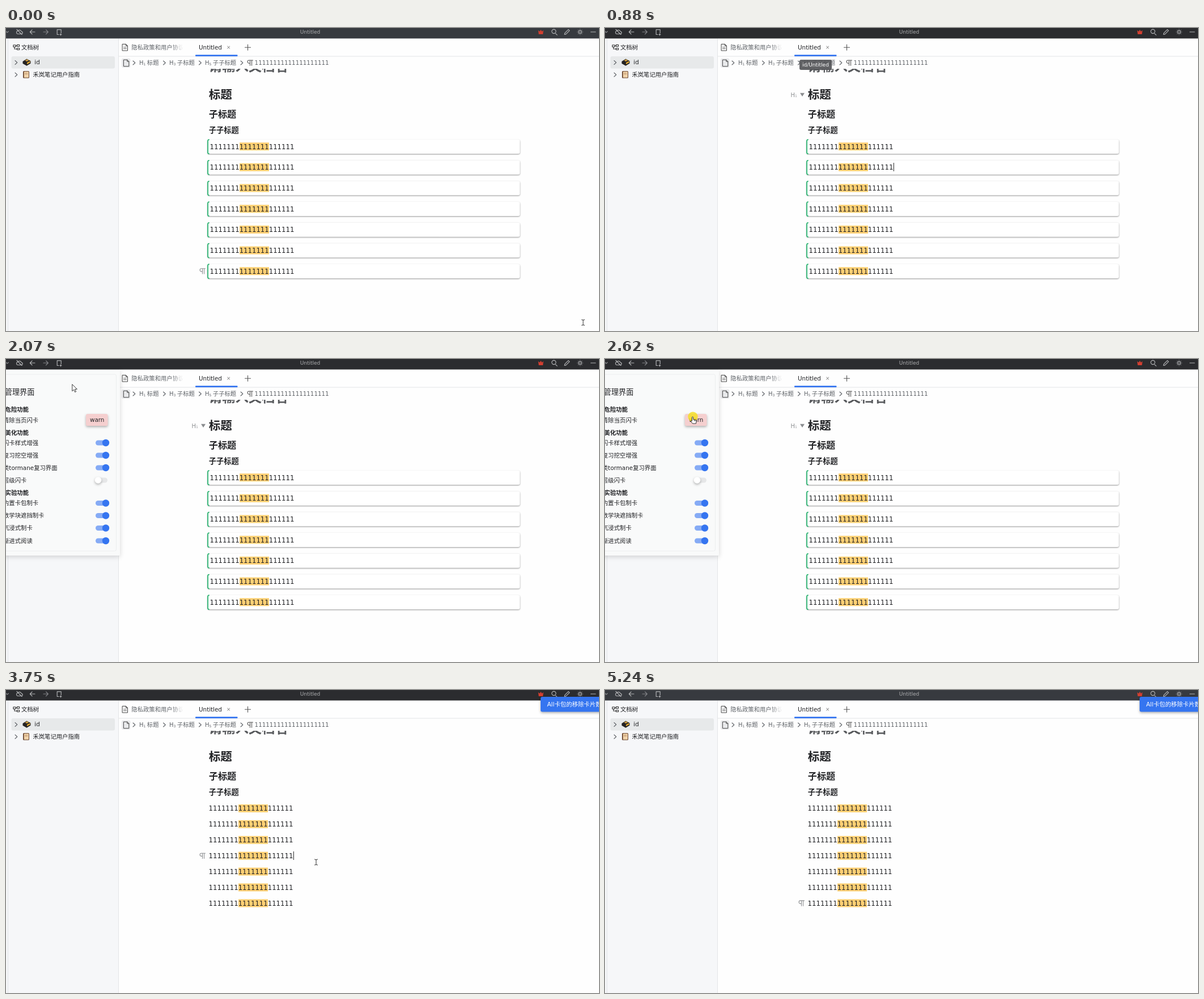
Animation of 1046x535 px, one loop 5.3 s. Source, as an HTML page:

```html
<!DOCTYPE html>
<html lang="zh-CN">
<head>
<meta charset="utf-8">
<title>Untitled</title>
<style>
  html, body { margin: 0; width: 100%; height: 100%; overflow: hidden; background: #fff; }
  svg { display: block; width: 1046px; height: 535px; }
  text { font-family: 'DejaVu Sans', 'Noto Sans CJK SC', 'Noto Sans CJK', sans-serif; white-space: pre; }
  .card { fill: #fff; filter: drop-shadow(.7px 1px 1px rgba(0,0,0,.42)); }
  .panel { filter: drop-shadow(0 2px 4px rgba(0,0,0,.16)); }
  .lift { filter: drop-shadow(0 2px 2px rgba(0,0,0,.3)); }
  .line { fill: none; stroke-linecap: round; stroke-linejoin: round; }
</style>
</head>
<body>
<svg id="stage" viewBox="0 0 1046 535" xmlns="http://www.w3.org/2000/svg"></svg>
<script>
const LOOP = 5300;
const BLUE = '#3575f0', INK = '#202124', GREY = '#5f6368', BAR_ICON = '#b4b5b7';

// Text is placed by its left edge and vertical centre.
const text = (x, cy, s, size = 10.35, fill = INK, extra = '') =>
  `<text x="${x}" y="${cy + size * .37}" font-size="${size}" fill="${fill}" ${extra}>${s}</text>`;
const rect = (x, y, w, h, fill, r = 0, extra = '') =>
  `<rect x="${x}" y="${y}" width="${w}" height="${h}" rx="${r}" fill="${fill}" ${extra}/>`;
const line = (d, color, width = 1, extra = '') =>
  `<path class="line" d="${d}" stroke="${color}" stroke-width="${width}" ${extra}/>`;
const group = (id, body, extra = '') => `<g id="${id}" ${extra}>${body}</g>`;

const chevron = (x, y, color = GREY) => line(`M${x - 2} ${y - 3.5}l3.8 3.5l-3.8 3.5`, color, 1.1);
const pilcrow = (x, y, color) =>
  line(`M${x + 10} ${y - 4.5}H${x + 3.2}a2.6 2.6 0 0 0 0 5.2H${x + 5}M${x + 5} ${y - 4.5}v9.3M${x + 8} ${y - 4.5}v9.3`, color, 1.1);
const headingMark = (x, y, n, color) =>
  text(x, y, 'H', 10, color) + text(x + 7.6, y + 2, n, 6, color);
const page = (x, y, lines) =>
  line(`M${x} ${y}h6l3 3v8.5h-9zM${x + 6} ${y}v3h3`, '#444', 1) +
  (lines ? line(`M${x + 2} ${y + 5.5}h5M${x + 2} ${y + 8}h5`, '#444', .8) : '');

const rowY = (i, carded) => carded ? 209.2 + i * 36.67 : 209 + i * 27.9;
const noteRow = (i, carded) => {
  const y = rowY(i, carded), x = carded ? 360 : 358;
  const frame = carded
    ? `<rect class="card" x="355.5" y="${y - 12.2}" width="551" height="25" rx="3"/>` +
      line(`M358 ${y - 12}q-2 .3 -2 2.5v20q0 2.2 2 2.5`, '#2fb574', 1.8)
    : '';
  return frame + rect(x + 52, y - 7, 52, 14, '#fdd074') + text(x - .4, y, '1'.repeat(20), 11.7);
};
const noteRows = carded => Array.from({ length: 7 }, (_, i) => noteRow(i, carded)).join('');

function topBar() {
  const icon = (d, color = BAR_ICON) => line(d, color, 1.15);
  return rect(0, 0, 1046, 18.5, '#2b2c2f', 0, 'id="bar"') +
    rect(81, 0, 24, 18.5, '#46474b', 0, 'id="hover"') +
    icon('M0 6l2.2 2l2.2 -2', '#8c8d90') +
    icon('M20.5 10.5h6.5a2.1 2.1 0 0 0 .3 -4.2a3.8 3.8 0 0 0 -6.8 -1a2.7 2.7 0 0 0 0 5.2M19 2.5l9 9') +
    icon('M51 7h-8.5m3.6 -3.8l-3.8 3.8l3.8 3.8') +
    icon('M66 7h8m-3.5 -3.8l3.8 3.8l-3.8 3.8', '#85868a') +
    icon('M93 11.5h-2.8v-8.7h7v6M95 11.5h3M96.5 10v3') +
    `<text x="536.5" y="10.3" font-size="9" fill="#aeafb1" text-anchor="middle">Untitled</text>` +
    `<path d="M938.8 4l2.6 2.3l2 -3.3l2 3.3l2.6 -2.3l-.9 7h-7.4z" fill="#d23f31"/>` +
    icon('M969.5 9.8l2.7 2.5M970 6a3.6 3.6 0 1 1 -7.2 0a3.6 3.6 0 1 1 7.2 0') +
    icon('M985.2 11.5l.6 -2.6l6.2 -6.2l2 2l-6.2 6.2z') +
    icon('M1015 7a2.4 2.4 0 1 1 -4.8 0a2.4 2.4 0 1 1 4.8 0') +
    icon('M1012.6 2.4v.4M1012.6 11.2v.4M1008 7h.4M1016.8 7h.4M1009.4 3.8l.2 .2M1015.6 10l.2 .2M1009.4 10.2l.2 -.2M1015.6 4l.2 -.2') +
    icon('M1031.5 7h8.5');
}

function sidebar() {
  return rect(0, 18.5, 198, 517, '#f6f7f9') + rect(3, 18.5, 1, 517, '#e2e4e7') +
    rect(198, 18.5, 1, 517, '#e4e5e7') +
    line('M13 30h4v3.5h-4zM19.5 29.5h4v3h-4zM19.5 35.5h4v3h-4zM17 31.5h2.5M15 33.5v3.5h4.5', '#333', 1.2) +
    text(27, 34, '文档树') +
    rect(9.5, 50, 182.5, 21.5, '#e7e9ea', 3) +
    chevron(18, 61) + chevron(18, 82.5) +
    '<path d="M29.5 59l7 -4.5l7 3.7v4.3l-7 4.3l-7 -4z" fill="#252323"/>' +
    '<path d="M33.5 57.3l3.5 -2.1l3.5 1.8l-3.7 2.2z" fill="#c99a43"/>' +
    '<path d="M37 61.3l5.5 -3v2.6l-5.5 3.2z" fill="#e7ae36"/>' +
    text(50.3, 60.3, 'id') +
    rect(30, 76, 11, 12.5, '#6b4730', 1.5) + rect(31.8, 77, 8.2, 10.5, '#f0d3aa', .8) +
    line('M33.5 79.5h4.5M33.5 81.5h4.5', '#b88b62', .8) +
    text(47.4, 82, '禾岚笔记用户指南');
}

function editor() {
  const crumb = (x, n, s) => headingMark(x, 61.5, n, GREY) + text(x + 13.8, 61.5, s, 10.35, GREY);
  return rect(199, 18.5, 847, 517, '#fefefe') + rect(199, 49.5, 847, 1, '#e4e5e7') +
    page(205.5, 28.5, true) + text(221.3, 34, '隐私政策和用户协议', 10.35, GREY) +
    rect(292, 25, 24, 18, 'url(#fade)') +
    text(340, 33.8, 'Untitled') + rect(334, 47.3, 74.5, 2.7, BLUE, 1) +
    line('M390.6 32.2l4 4m0 -4l-4 4', '#666', .9) + line('M421.5 34.3h10M426.5 29.3v10', '#555', 1.1) +
    rect(204, 53.5, 15.5, 16.5, '#e9eaec', 3) + page(207.8, 56.2) +
    [226, 279.5, 342.5, 416].map(x => chevron(x, 61.5)).join('') +
    crumb(235, 1, '标题') + crumb(288, 3, '子标题') + crumb(351, 5, '子子标题') +
    pilcrow(425.5, 61.5, '#555') + text(438.6, 61.5, '1'.repeat(20), 10.3, GREY) +
    `<g clip-path="url(#scroll)">${text(357.8, 67.2, '请输入文档名', 23.3, '#57595c', 'font-weight="700"')}</g>` +
    text(357.8, 117.6, '标题', 20.5, INK, 'font-weight="700"') +
    text(357.8, 152.5, '子标题', 16.15, INK, 'font-weight="700"') +
    text(357.8, 180, '子子标题', 13.25, INK, 'font-weight="700"');
}

function settingsPanel() {
  const section = (y, s) => text(-1.5, y, s, 10.4, INK, 'font-weight="700"');
  const toggle = (y, s, on = true) => text(-5, y, s) + (on
    ? rect(158, y - 4.5, 24, 9, '#86abf5', 4.5) + `<circle cx="176" cy="${y}" r="6.2" fill="${BLUE}"/>`
    : rect(157, y - 4.5, 22, 9, '#e6e7e8', 4.5) + `<circle class="lift" cx="162.5" cy="${y}" r="5.8" fill="#fff"/>`);
  return rect(-10, 19, 211, 328, '#f9fafa', 2, 'class="panel"') +
    rect(-10, 27, 204.5, 312, 'none', 3, 'stroke="#eceeef"') +
    text(-2.3, 58.5, '管理界面', 13.2) +
    section(89.5, '危险功能') + text(-5, 108, '清除当页闪卡') +
    rect(141, 97, 38.5, 21, '#f5cfcf', 3, 'class="lift"') + text(148, 107.3, 'warn') +
    section(130, '美化功能') + toggle(148, '闪卡样式增强') + toggle(170, '复习挖空增强') +
    toggle(192, '类tormane复习界面') + toggle(214, '层级闪卡', false) +
    section(236.5, '实验功能') + toggle(254.5, '内置卡包制卡') + toggle(276.5, '数学块遮挡制卡') +
    toggle(298.5, '沉浸式制卡') + toggle(321, '渐进式阅读');
}

const tooltip = (id, x, y, w, h, s, pad) =>
  group(id, rect(x, y, w, h, '#55575a', 3, 'fill-opacity=".93"') + text(x + pad, y + h / 2 - .3, s, 9, '#fff'));

const cursors =
  group('ibeam', line('M-2.5 -5q2 0 2.5 1q.5 -1 2.5 -1M0 -4v8M-2.5 5q2 0 2.5 -1q.5 1 2.5 1', '#333', 1)) +
  group('arrow', '<path d="M0 0v12l2.8 -2.6l2 4.4l2 -.9l-2 -4.3h3.8z" fill="#fff" stroke="#222" stroke-width=".9"/>') +
  group('hand', '<path d="M-1.5 .5q1.3 -1.2 2.2 .3v4l4.3 .9q1.3 .4 1.2 2l-.7 4.3h-6l-3.4 -4.2q.6 -1.6 2.4 -.1z" fill="#fff" stroke="#222" stroke-width=".9" stroke-linejoin="round"/>' +
    line('M2.3 5v2.5M4 5.4v2.3', '#222', .6));

document.getElementById('stage').innerHTML =
  `<defs>
    <linearGradient id="fade"><stop stop-color="#fefefe" stop-opacity="0"/><stop offset=".85" stop-color="#fefefe"/></linearGradient>
    <clipPath id="scroll"><rect x="199" y="72" width="847" height="463"/></clipPath>
  </defs>` +
  editor() + sidebar() + topBar() +
  group('cards', noteRows(true)) + group('plain', noteRows(false)) +
  group('paraMark', pilcrow(341.5, 0, '#8e9093')) +
  group('headMark', headingMark(327.5, 118, 1, '#8e9093') + '<path d="M344 114.8h8l-4 6.2z" fill="#8b8d90"/>') +
  rect(0, 0, 1, 15, '#222', 0, 'id="caret"') +
  group('panel', settingsPanel()) +
  tooltip('tabTip', 343, 56, 57, 18, 'id/Untitled', 5) +
  tooltip('menuTip', 39.5, 21.5, 64.5, 19.5, '打开闪卡菜单', 5.3) +
  group('toast', rect(943, 12, 190, 26.5, BLUE, 3, 'class="lift"') +
    text(954.5, 24.7, 'All卡包的移除卡片数量为7', 10.4, '#fff', 'font-weight="500"')) +
  group('mouse', '<circle id="click" r="8.7" fill-opacity=".8"/>' + cursors);

const el = {};
document.querySelectorAll('#stage [id]').forEach(node => el[node.id] = node);

// Pointer path: time, x, y
const path = [
  [60, 1018, 520], [280, 600, 247], [520, 600, 247], [640, 470, 130], [780, 365, 36], [870, 400, -20],
  [1270, 330, -20], [1350, 300, 6], [1600, 93, 9], [1860, 93, 9], [2410, 155, 102], [2920, 155, 102],
  [3110, 444, 213], [3420, 547, 304], [3880, 547, 304], [4100, 801, 494], [4170, 830, 560]
];

function pointerAt(t) {
  const next = path.findIndex(key => key[0] > t);
  if (next === 0) return path[0].slice(1);
  if (next < 0) return path[path.length - 1].slice(1);
  const [t0, x0, y0] = path[next - 1], [t1, x1, y1] = path[next];
  const k = (t - t0) / (t1 - t0);
  return [x0 + (x1 - x0) * k, y0 + (y1 - y0) * k];
}

const show = (node, on) => node.setAttribute('display', on ? 'inline' : 'none');
const move = (node, x, y) => node.setAttribute('transform', `translate(${x} ${y})`);

function render(t) {
  const during = (a, b) => t >= a && t < b;
  const carded = t < 2740;

  el.bar.setAttribute('fill', during(470, 5170) ? '#2b2c2f' : '#373a3f');
  show(el.hover, during(1540, 1950));
  show(el.cards, carded);
  show(el.plain, !carded);
  show(el.panel, during(1810, 3690));
  show(el.tabTip, during(770, 950));
  show(el.menuTip, during(1600, 1880));

  const onHeading = during(620, 3200);
  const row = t < 250 || t >= 4030 ? 6 : t < 620 ? 1 : 3;
  show(el.headMark, onHeading);
  show(el.paraMark, !onHeading);
  move(el.paraMark, 0, rowY(row, carded));

  show(el.caret, during(540, 1070) || during(1600, 1680) || during(3640, 4170) || during(4700, 5230));
  move(el.caret, carded ? 508.8 : 506.8, carded ? 238 : 285);

  const slide = Math.min(1, Math.max(0, (t - 2950) / 140));
  show(el.toast, t >= 2950);
  move(el.toast, 103 * (1 - slide) ** 2, 0);

  const [x, y] = pointerAt(t);
  const overText = x > 201 && y > 75;
  const overButton = during(1560, 1880) || during(2330, 2960);
  move(el.mouse, x, y);
  show(el.ibeam, overText);
  show(el.hand, !overText && overButton);
  show(el.arrow, !overText && !overButton);
  const rightClick = during(1670, 1810);
  show(el.click, rightClick || during(470, 540) || during(2550, 2740) || during(3630, 3700));
  el.click.setAttribute('fill', rightClick ? '#e0161c' : '#f5df1c');
}

const start = performance.now();
function tick() {
  render((performance.now() - start) % LOOP);
  requestAnimationFrame(tick);
}
tick();
</script>
</body>
</html>
```
